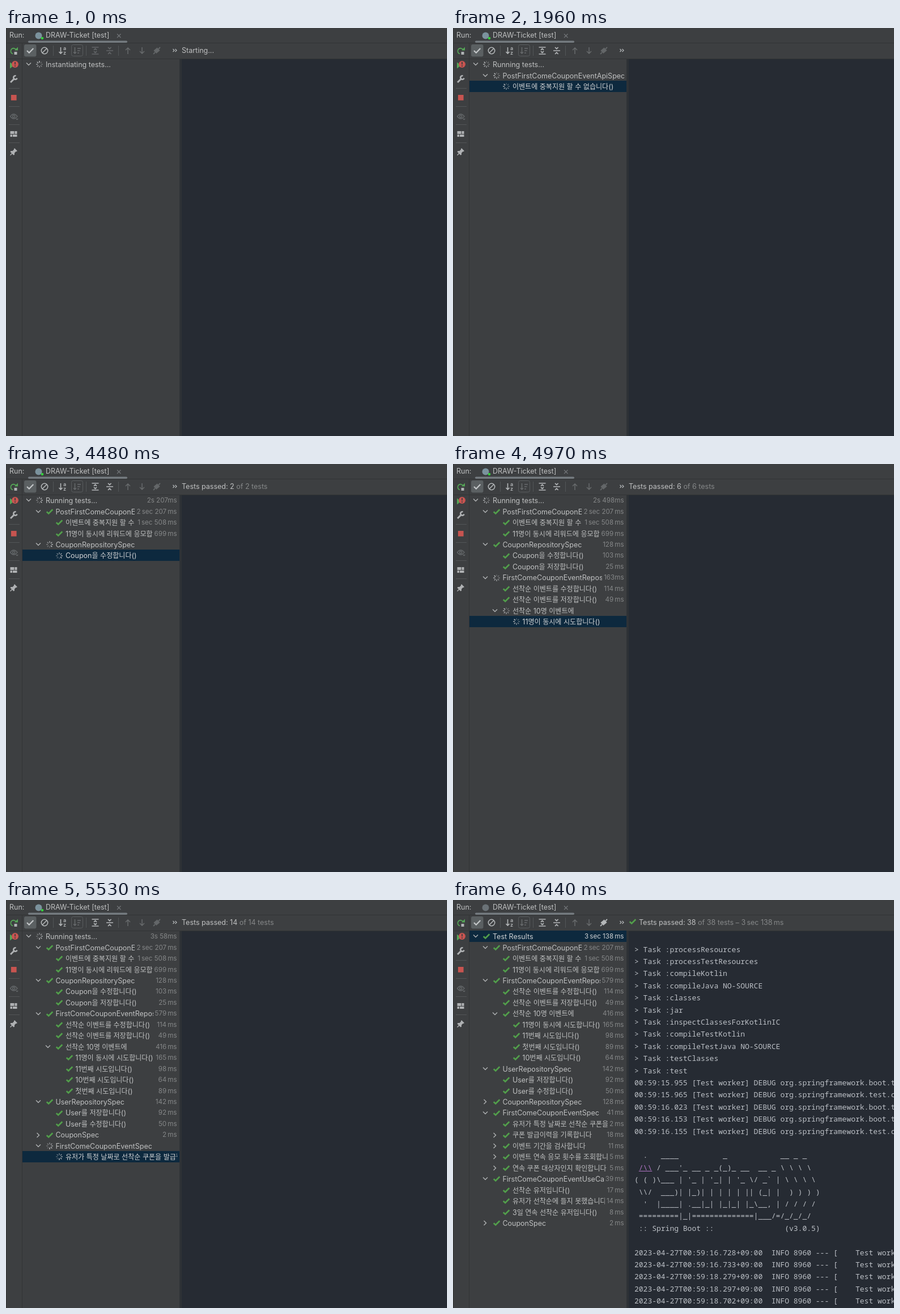
These frames come from a looping animation (778x720 px, 7980 ms). An HTML page:

```html
<!DOCTYPE html>
<html lang="ko">
<head>
<meta charset="utf-8">
<title>Test run</title>
<style>
html, body { margin: 0; width: 100%; height: 100%; overflow: hidden; background: #3d3f41; }
body { position: relative; font: 12.5px/19.46px Inter, "Noto Sans CJK KR", sans-serif; color: #bfc0c1; white-space: pre; }
body > * { position: absolute; }
#chrome { left: 0; top: 0; }
#tree { left: 29px; top: 54.2px; width: 276.5px; height: 665.8px; overflow: hidden; }
.row { position: relative; display: flex; height: 19.46px; padding-right: 4px; box-sizing: border-box; }
.row svg { position: absolute; top: 10.2px; width: 1px; height: 1px; overflow: visible; }
.name, .time { position: relative; top: 1px; }
.name { flex: 1; overflow: hidden; }
.time { margin-left: 3px; font-size: 11.6px; color: #858788; }
.selected { background: #0d293e; }
.selected .time, .selected .name { color: #d0d2d4; }
.hangul { font-size: .965em; }
.gray { color: #858788; }
.label { line-height: 20px; }
#console { left: 306px; top: 55px; right: 0; bottom: 0; overflow: hidden; background: #262b33; border-left: 4px solid #2e3236; }
#log { margin: 0; position: absolute; left: 10px; top: 21.5px; font: 13px/21.4px "Noto Sans Mono", monospace; color: #bcc0c6; }
#log u { text-decoration: none; }
#log.linked u { color: #b476c8; text-decoration: underline; }
</style>
</head>
<body>
<svg id="chrome" width="778" height="720" fill="none" stroke-width="1.6">
  <path stroke="#323435" stroke-width="1" d="M0 26.5H778M0 54.5H778M28.5 27V720M.5 0V720"/>
  <rect x="39" y="22.5" width="175" height="3.5" rx="1.7" fill="#757b80"/>
  <circle id="logo" cx="57.5" cy="13.5" r="6" fill="#7b929d"/>
  <circle id="dot" cx="64" cy="18" r="2.3" fill="#35d13d"/>
  <path stroke="#74777a" stroke-width="1.1" d="M196 10.5l6.5 6.5m0-6.5l-6.5 6.5"/>
  <path stroke="#525557" stroke-width="1" d="M5 106.5H24M5 138.5H24M5 170.5H24M5 202.5H24M83.5 31V49M141.5 31V49M198.5 31V49"/>

  <!-- side bar -->
  <path stroke="#55a557" stroke-width="1.8" d="M12 45.6A5 5 0 1 1 18 39"/>
  <path fill="#55a557" d="M15 39.5h6v-6z"/>
  <rect x="14.5" y="42" width="5" height="5" fill="#b0b3b5"/>
  <path fill="#55a557" d="M7 60.5v11l7-5.5z"/>
  <circle cx="16" cy="64" r="6" fill="#c75450"/>
  <path stroke="#3d3f41" stroke-width="1.8" d="M16 60v4.5m0 1.5v2"/>
  <path stroke="#afb1b3" stroke-width="3" d="M8 96l7-7"/>
  <path stroke="#afb1b3" stroke-width="2.6" d="M17.5 84.5a3.2 3.2 0 1 0 2 4"/>
  <rect x="8.9" y="118" width="9.7" height="9.7" fill="#c75450"/>
  <g stroke="#64686a" stroke-width="1.3"><path d="M7.5 156q6-8 12.5 0q-6.5 8-12.5 0z"/><circle cx="13.7" cy="156" r="2"/></g>
  <path fill="#64686a" d="M17 160h5l-2.5 2.5z"/>
  <path fill="#afb1b3" d="M7.5 182h7v5h-7zM15.5 182h4v5h-4zM7.5 188h3.5v4h-3.5zM12 188h7.5v4h-7.5z"/>
  <path fill="#afb1b3" d="M15 212l5 5-1.5 1-1 0-2.5 2.5 0 3-1.5 1-6-6 1-1.5 3 0 2.5-2.5 0-1z"/>
  <path stroke="#afb1b3" stroke-width="1.4" d="M7.5 224.5l3.5-3.5"/>

  <!-- tool bar -->
  <rect x="32" y="29" width="21.5" height="21.5" rx="3" fill="#5b6062"/>
  <path stroke="#c4c7c9" stroke-width="2.2" d="M37 40l3.8 3.8 7.5-7.8"/>
  <g stroke="#b4b7b9">
    <circle cx="68" cy="40" r="5.7"/><path d="M64 44l8-8M96.5 34V45m-3-3l3 3.2 3-3.2"/>
    <path stroke-width="1.3" d="M294.5 37l2.5 2.5-2.5 2.5m4-5l2.5 2.5-2.5 2.5"/>
  </g>
  <g fill="#b4b7b9" font-family="Inter, sans-serif" font-size="9" font-weight="600"><text x="101" y="39">a</text><text x="101" y="47">z</text></g>
  <rect x="115.5" y="29.5" width="20" height="20" rx="3" stroke="#595c5e" stroke-width="1"/>
  <g stroke="#686b6d" stroke-width="1.5"><path d="M121.5 34V45m-2.5-2.5l2.5 2.5 2.5-2.5M126 36h6m-6 4h4.5m-4.5 4h3"/>
    <path d="M215 46V35m-4 4l4-4 4 4M240 34V45m-4-4l4 4 4-4"/></g>
  <g id="folding" stroke-width="1.7"><path d="M151.5 34H163.5M151.5 46H163.5M155 38.8l2.5-2.3 2.5 2.3M155 41.2l2.5 2.3 2.5-2.3"/>
    <path d="M177 40H189M180 34l2.8 2.7 2.8-2.7M180 46l2.8-2.7 2.8 2.7"/></g>
  <g id="plug" stroke-width="1.8"><path d="M260 46l3-3M269 37l3-3"/><path stroke-width="4.5" d="M262 38.5l5 5M265 36l5 5"/></g>
</svg>
<span class="label" style="left:6px;top:3px">Run:</span>
<span class="label" style="left:70px;top:3px">DRAW-Ticket [test]</span>
<span class="label" id="status" style="left:310px;top:29.5px"></span>
<div id="tree"></div>
<div id="console"><pre id="log">
&gt; Task :processResources
&gt; Task :processTestResources
&gt; Task :compileKotlin
&gt; Task :compileJava NO-SOURCE
&gt; Task :classes
&gt; Task :jar
&gt; Task :inspectClassesForKotlinIC
&gt; Task :compileTestKotlin
&gt; Task :compileTestJava NO-SOURCE
&gt; Task :testClasses
&gt; Task :test
00:59:15.955 [Test worker] DEBUG org.springframework.boot.test
00:59:15.965 [Test worker] DEBUG org.springframework.test.context
00:59:16.023 [Test worker] DEBUG org.springframework.boot.test
00:59:16.153 [Test worker] DEBUG org.springframework.boot.test
00:59:16.155 [Test worker] DEBUG org.springframework.test.context

  .   ____          _            __ _ _
 <u>/\\</u> / ___'_ __ _ _(_)_ __  __ _ \ \ \ \
( ( )\___ | '_ | '_| | '_ \/ _` | \ \ \ \
 \\/  ___)| |_)| | | | | || (_| |  ) ) ) )
  '  |____| .__|_| |_|_| |_\__, | / / / /
 =========|_|==============|___/=/_/_/_/
 :: Spring Boot ::                (v3.0.5)

2023-04-27T00:59:16.728+09:00  INFO 8960 --- [    Test worker]
2023-04-27T00:59:16.733+09:00  INFO 8960 --- [    Test worker]
2023-04-27T00:59:18.279+09:00  INFO 8960 --- [    Test worker]
2023-04-27T00:59:18.297+09:00  INFO 8960 --- [    Test worker]
2023-04-27T00:59:18.702+09:00  INFO 8960 --- [    Test worker]</pre></div>
<script>
const LOOP = 7980, TICK = 70, SPIN = 125;
const FIRST_TEST = 560, RERUN_READY = 5600, FINISH = 6300, LINKED = 6440;
const $ = id => document.getElementById(id);

const test = (name, ms, end, start) => ({ name: name + '()', ms, end, start, count: 1 });
const folded = (name, ms, end, count) => ({ name, ms, end, count, closed: true });
const group = (name, ...kids) => ({ name, kids });
const foldedAtEnd = node => ({ ...node, foldLate: true });

const root = group('Test Results',
  group('PostFirstComeCouponEventApiSpec',
    test('이벤트에 중복지원 할 수 없습니다', 1508, 2030, FIRST_TEST),
    test('11명이 동시에 리워드에 응모합니다', 699, 2730)),
  foldedAtEnd(group('CouponRepositorySpec',
    test('Coupon을 수정합니다', 103, 4550, 4410),
    test('Coupon을 저장합니다', 25, 4620))),
  group('FirstComeCouponEventRepositorySpec',
    test('선착순 이벤트를 수정합니다', 114, 4760),
    test('선착순 이벤트를 저장합니다', 49, 4830),
    group('선착순 10명 이벤트에',
      test('11명이 동시에 시도합니다', 165, 5000),
      test('11번째 시도입니다', 98, 5110),
      test('10번째 시도입니다', 64, 5180),
      test('첫번째 시도입니다', 89, 5320))),
  group('UserRepositorySpec',
    test('User를 저장합니다', 92, 5410),
    test('User를 수정합니다', 50, 5460)),
  folded('CouponSpec', 2, 5530, 2),
  group('FirstComeCouponEventSpec',
    test('유저가 특정 날짜로 선착순 쿠폰을 발급합니다', 2, 5600),
    folded('이벤트 기간을 검사합니다', 11, 5650, 4),
    foldedAtEnd(group('쿠폰 발급이력을 기록합니다',
      test('이전 선착순 응모 기록이 없습니다', 3, 5680),
      test('3일 연속 선착순 이후 2일뒤 선착순 유저입니다', 3, 5710),
      test('6일 연속 선착순 이후 2일뒤 선착순 유저입니다', 2, 5740),
      test('이미 선착순에 든 유저는 쿠폰이 없습니다', 7, 5770),
      test('7일 연속 선착순 유저입니다', 1, 5800),
      test('8일 연속 선착순 유저입니다', 2, 5830))),
    folded('이벤트 연속 응모 횟수를 조회합니다', 5, 5870, 5),
    folded('연속 쿠폰 대상자인지 확인합니다', 5, 5900, 5)),
  group('FirstComeCouponEventUseCaseSpec',
    test('선착순 유저입니다', 17, 5940),
    test('3일 연속 선착순 유저입니다', 8, 5970),
    test('유저가 선착순에 들지 못했습니다', 14, 6000)));

const leavesOf = node => node.kids ? node.kids.flatMap(leavesOf) : [node];
const leaves = leavesOf(root);
leaves.forEach((leaf, i) => leaf.start ??= leaves[i - 1].end);

const total = (list, key) => list.reduce((sum, item) => sum + item[key], 0);
const totalMs = node => total(leavesOf(node), 'ms');
const isBranch = node => Boolean(node.kids || node.closed);
const byDuration = (a, b) => isBranch(a) - isBranch(b) || totalMs(b) - totalMs(a);

function duration(ms, done) {
  const gap = done ? '\u2009' : '', sec = Math.floor(ms / 1000);
  return (sec ? `${sec}${gap}${done ? 'sec' : 's'} ` : '') + `${ms % 1000}${gap}ms`;
}

const icon = (x, body) => `<svg style="left:${x}px" fill="none">${body}</svg>`;
const CHECK = '<path stroke="#529f4b" stroke-width="2.7" d="M-5.3 .2L-1.8 3.4L5.3 -3.8"/>';
const chevron = open => `<path stroke="#afb1b3" stroke-width="1.4" d="${open ? 'M-4 -2.5L0 1.5L4 -2.5' : 'M-2.5 -4L1.5 0L-2.5 4'}"/>`;

function spinner(t) {
  const head = Math.floor(t / SPIN) % 8;
  return Array.from({ length: 8 }, (_, k) =>
    `<path stroke="#c0c2c4" stroke-width="1.4" opacity="${1 - (head - k + 8) % 8 / 10}" transform="rotate(${k * 45})" d="M0 -2.8V-6"/>`).join('');
}

const wrapHangul = text => text.replace(/[가-힣]+/g, '<span class="hangul">$&</span>');

function rows(node, t, depth, selected) {
  const mine = leavesOf(node), finished = t >= FINISH;
  if (node !== root && mine[0].start > t) return '';
  const passed = mine.filter(leaf => leaf.end <= t);
  const done = node === root ? finished : passed.length === mine.length;
  const open = node.kids && !(finished && node.foldLate);
  const name = node !== root || finished ? node.name
    : t < FIRST_TEST ? 'Instantiating tests...' : 'Running tests...';
  const indent = depth * 17.45;
  const kids = !open ? [] : finished ? [...node.kids].sort(byDuration) : node.kids;
  return `<div class="row${node === selected ? ' selected' : ''}" style="padding-left:${41 + indent}px">`
    + (isBranch(node) ? icon(10.5 + indent, chevron(open)) : '')
    + icon(30.3 + indent, done ? CHECK : spinner(t))
    + `<span class="name">${wrapHangul(name)}</span>`
    + (passed.length ? `<span class="time">${duration(total(passed, 'ms'), done)}</span>` : '')
    + '</div>' + kids.map(kid => rows(kid, t, depth + 1, selected)).join('');
}

function status(t) {
  const count = total(leaves.filter(leaf => leaf.end <= t), 'count');
  if (t < FIRST_TEST) return 'Starting...';
  if (!count) return '';
  const finished = t >= FINISH;
  const mark = finished ? `<svg width="18" height="12" viewBox="-7 -6 18 12" fill="none">${CHECK}</svg>` : '';
  return `${mark}Tests passed: ${count}<span class="gray"> of ${count} test${count > 1 ? 's' : ''}`
    + (finished ? ` – ${duration(totalMs(root), true)}` : '') + '</span>';
}

function render(t) {
  const finished = t >= FINISH;
  const selected = finished ? root : leaves.filter(leaf => leaf.start <= t).pop();
  const toolColor = enabled => enabled ? '#b4b7b9' : '#636668';
  $('tree').innerHTML = rows(root, t, 0, selected);
  $('status').innerHTML = status(t);
  $('folding').setAttribute('stroke', toolColor(t >= FIRST_TEST));
  $('plug').setAttribute('stroke', toolColor(t >= RERUN_READY));
  $('logo').setAttribute('fill', finished ? '#6a7277' : '#7b929d');
  $('dot').style.display = finished ? 'none' : '';
  $('log').style.display = finished ? '' : 'none';
  $('log').classList.toggle('linked', t >= LINKED);
}

let shown = -1;
function frame() {
  const t = Math.floor(performance.now() % LOOP / TICK) * TICK;
  const held = Math.min(t, LINKED);
  if (held !== shown) render(shown = held);
  requestAnimationFrame(frame);
}
frame();
</script>
</body>
</html>
```
